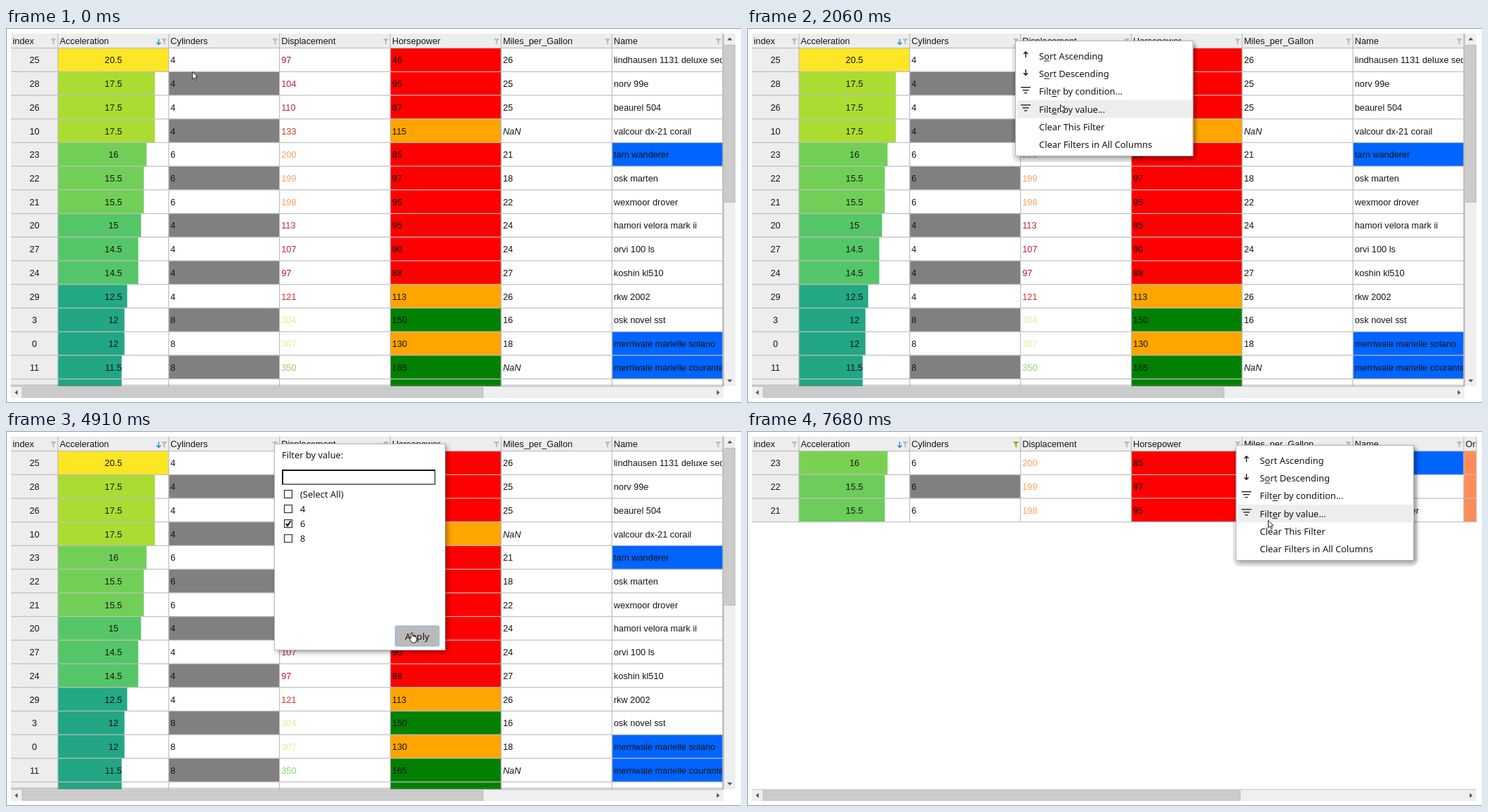
Write an HTML page with a canvas that moves like this. It is 1047 by 535 pixels and loops after 7990 ms.

```html
<!DOCTYPE html>
<html lang="en">
<head>
<meta charset="utf-8">
<style>
html, body { margin: 0; height: 100%; overflow: hidden; background: #fff; }
canvas { display: block; width: 1047px; height: 535px; }
</style>
</head>
<body>
<canvas id="stage"></canvas>
<script>
const LOOP = 7990, TOP = 28.5, ROW = 33.72, COL = 157.85;
const GRID_FONT = '12.75px "Liberation Sans", Arial, sans-serif';
const MENU_FONT = '12.9px "Noto Sans", "Open Sans", sans-serif';
const LINE = '#bebebe', INK = '#151515';

const canvas = document.getElementById('stage');
const ratio = window.devicePixelRatio || 1;
canvas.width = 1047 * ratio;
canvas.height = 535 * ratio;
const c = canvas.getContext('2d');
c.scale(ratio, ratio);

const headers = ['index', 'Acceleration', 'Cylinders', 'Displacement', 'Horsepower', 'Miles_per_Gallon', 'Name', 'Origin'];
const cars = `25|20.5|4|97|46|26|lindhausen 1131 deluxe sedan
28|17.5|4|104|95|25|norv 99e
26|17.5|4|110|87|25|beaurel 504
10|17.5|4|133|115|NaN|valcour dx-21 corail
23|16|6|200|85|21|tarn wanderer
22|15.5|6|199|97|18|osk marten
21|15.5|6|198|95|22|wexmoor drover
20|15|4|113|95|24|hamori velora mark ii
27|14.5|4|107|90|24|orvi 100 ls
24|14.5|4|97|88|27|koshin kl510
29|12.5|4|121|113|26|rkw 2002
3|12|8|304|150|16|osk novel sst
0|12|8|307|130|18|merriwale marielle solano
11|11.5|8|350|165|NaN|merriwale marielle courante
1|11.5|8|350|165|15|`.split('\n').map(line => line.split('|'));
const sixes = cars.filter(car => car[2] === '6');

const colX = i => i ? 74 + (i - 1) * COL : 7;
const pick = (v, stops) => stops.find(s => v < s[0])[1];
const barColor = v => pick(v, [[12.2, '#22a685'], [14, '#23a983'], [15.2, '#55c667'],
  [16.5, '#71cf57'], [19, '#abdc32'], [99, '#fde624']]);
const dispColor = v => pick(v, [[100, '#b0142f'], [115, '#c3233a'], [150, '#d7302f'],
  [250, '#fb9f5b'], [320, '#dcf08f'], [999, '#8fd067']]);
const powerColor = v => pick(v, [[100, '#f00'], [150, '#ffa500'], [999, '#008000']]);

function box(x, y, w, h, fill) {
  c.fillStyle = fill;
  c.fillRect(x, y, w, h);
}

function text(s, x, y, { font = GRID_FONT, color = INK, align = 'left' } = {}) {
  c.font = font;
  c.fillStyle = color;
  c.textAlign = align;
  c.fillText(s, x, y);
}

function shape(x, y, points, fill, stroke) {
  c.beginPath();
  points.forEach(([px, py]) => c.lineTo(x + px, y + py));
  c.closePath();
  c.fillStyle = fill;
  c.fill();
  if (stroke) {
    c.strokeStyle = stroke;
    c.lineWidth = 1;
    c.stroke();
  }
}

function lines(color, width, ...paths) {
  c.strokeStyle = color;
  c.lineWidth = width;
  c.beginPath();
  for (const path of paths) path.forEach(([x, y], i) => i ? c.lineTo(x, y) : c.moveTo(x, y));
  c.stroke();
}

// dir is 1 for down, -1 for up
function arrow(x, y, dir, color) {
  lines(color, 1.4, [[x, y - 4 * dir], [x, y + 4 * dir]],
    [[x - 3, y + dir], [x, y + 4 * dir], [x + 3, y + dir]]);
}

function clipped(x, y, w, h, draw) {
  c.save();
  c.beginPath();
  c.rect(x, y, w, h);
  c.clip();
  draw();
  c.restore();
}

function drawHeader(right, filtered) {
  box(7, 8, right - 7, 20, '#ededed');
  headers.forEach((name, i) => {
    const edge = colX(i + 1);
    text(name, colX(i) + 2.5, 23);
    const color = filtered && i === 2 ? '#b3a000' : '#bcbcbc';
    shape(edge - 10.5, 15, [[0, 0], [8, 0], [5, 4], [5, 9], [3, 7.5], [3, 4]], color);
  });
  arrow(217.5, 19.5, 1, '#1296ae');
}

function drawRow(car, r, filtered) {
  const [index, accel, cyl, disp, power, mpg, name] = car;
  const y = TOP + r * ROW, base = y + ROW / 2 + 5;
  const cell = (i, fill) => box(colX(i), y, COL, ROW, fill);
  box(7, y, 67, ROW, '#ededed');
  const bar = filtered ? (accel > 15.7 ? '#7ad151' : '#6ccd5a') : barColor(+accel);
  box(74, y, COL * Math.min(1, accel / 20), ROW, bar);
  if (r % 2) cell(2, '#808080');
  cell(4, powerColor(+power));
  if (/^(tarn|merriwale)/.test(name)) cell(6, '#0064ff');
  cell(7, '#fc8d59');
  text(index, 40.5, base, { align: 'center' });
  text(accel, 153, base, { align: 'center' });
  text(cyl, colX(2) + 2.5, base);
  text(disp, colX(3) + 2.5, base, { color: dispColor(+disp) });
  text(power, colX(4) + 2.5, base);
  text(mpg, colX(5) + 2.5, base, { font: (mpg === 'NaN' ? 'italic ' : '') + GRID_FONT });
  clipped(colX(6), y, COL - 1, ROW, () => text(name, colX(6) + 2.5, base));
}

function drawGrid(filtered) {
  const rows = filtered ? sixes : cars, right = filtered ? 1039 : 1022;
  const bottom = Math.min(511, TOP + rows.length * ROW);
  clipped(7, 8, right - 7, bottom - 7, () => {
    drawHeader(right, filtered);
    rows.forEach((car, r) => drawRow(car, r, filtered));
    for (let r = 0; r <= rows.length; r++) box(7, TOP - .5 + r * ROW, right - 7, 1.2, LINE);
    for (let i = 1; i < 8; i++) box(colX(i) - .7, 8, 1.2, bottom - 7, LINE);
  });
  if (filtered) box(1038.5, 8, 1, bottom - 8, LINE);
  else {
    box(7, 508.5, 1015, 2.5, 'rgba(120,120,120,.3)');
    box(1021.5, 8, 1.3, 503, '#b5b5b5');
  }
}

function drawScrollbars(filtered) {
  const right = filtered ? 1039 : 1022, tri = '#505050';
  box(7, 512, right - 7, 16, '#efefef');
  box(7, 511, right - 7, 1, '#c4c4c4');
  box(22.5, 512.5, filtered ? 680.5 : 657.5, 15, '#bdbdbd');
  box(23.5, 513.5, filtered ? 678.5 : 655.5, 13, '#cbcbcb');
  shape(15, 520, [[-2.5, 0], [1.5, -3.5], [1.5, 3.5]], tri);
  shape(right - 8, 520, [[2.5, 0], [-1.5, -3.5], [-1.5, 3.5]], tri);
  if (filtered) return;
  box(1023, 8, 16, 503, '#efefef');
  box(1023.5, 24, 15.5, 225, '#bdbdbd');
  box(1024.5, 25, 13.5, 223, '#cbcbcb');
  shape(1031, 16, [[0, -2.5], [3.5, 1.5], [-3.5, 1.5]], tri);
  shape(1031, 503, [[0, 2.5], [3.5, -1.5], [-3.5, -1.5]], tri);
}

function drawPanel(x, y, w, h) {
  c.save();
  c.shadowColor = 'rgba(0,0,0,.4)';
  c.shadowBlur = 7 * ratio;
  c.shadowOffsetX = c.shadowOffsetY = 2.5 * ratio;
  box(x, y, w, h, '#fff');
  c.restore();
  c.strokeStyle = '#b4b4b4';
  c.lineWidth = 1;
  c.strokeRect(x + .5, y + .5, w - 1, h - 1);
}

const menuItems = [['Sort Ascending', 1], ['Sort Descending', 1], ['Filter by condition...', 4],
  ['Filter by value...', 4], ['Clear This Filter'], ['Clear Filters in All Columns']];

function drawMenu(x, y, mouse) {
  c.fillStyle = 'rgba(0,0,0,.08)';
  c.beginPath();
  c.roundRect(x - 4.5, y + 3, 263, 170, 9);
  c.fill();
  drawPanel(x, y, 253.5, 165);
  menuItems.forEach(([label, key], i) => {
    const mid = y + 22 + i * 25.25, iconX = x + 15, iconY = mid - 2;
    const inside = mouse.x > x + 3 && mouse.x < x + 253;
    if (inside && Math.abs(mouse.y - mid) < 12.6) box(x + 3, mid - 12.6, 250, 25.2, '#ededed');
    if (i < 2) arrow(iconX, iconY, i ? 1 : -1, INK);
    else if (i < 4) [7, 4.5, 2].forEach((half, k) => box(iconX - half, iconY - 4.5 + k * 4, 2 * half, 1.3, INK));
    text(label, x + 34, mid + 4.8, { font: MENU_FONT });
    if (key) {
      const start = c.measureText(label.slice(0, key)).width;
      box(x + 34 + start, mid + 6.5, c.measureText(label[key]).width, 1, INK);
    }
  });
}

function drawDialog(t, mouse) {
  drawPanel(382, 18, 244, 295);
  text('Filter by value:', 393, 38.5, { font: MENU_FONT });
  box(393, 55, 219, 22, '#777');
  box(393, 55, 218, 2, '#111');
  box(393, 55, 2, 21, '#111');
  box(395, 57, 215, 18, '#fff');
  ['(Select All)', '4', '6', '8'].forEach((label, i) => {
    const y = 90 + i * 21.1;
    c.strokeStyle = '#222';
    c.lineWidth = 1.1;
    c.strokeRect(396.5, y - 5.5, 11, 11);
    const checked = t < 3440 || (i === 2 && t >= 3970);
    if (checked) lines('#111', 2, [[398.8, y], [401, y + 3], [405.5, y - 3.8]]);
    text(label, 419, y + 4.7, { font: MENU_FONT });
  });
  const pressed = t >= 4910, hover = mouse.y > 278 && mouse.x > 554;
  c.beginPath();
  c.roundRect(554.5, 278, 62.5, 29, 2);
  c.fillStyle = pressed ? '#bababa' : hover ? '#e6e6e6' : '#fff';
  c.fill();
  c.strokeStyle = pressed ? '#86b5dc' : '#c4c4c4';
  c.lineWidth = 1;
  c.stroke();
  text('Apply', 585.7, 297.5, { font: MENU_FONT.replace('12.9', '13.2'), align: 'center' });
}

function drawPointer({ x, y }, hand) {
  if (hand) {
    shape(x - 3, y - 1, [[2, 0], [4, 0], [4.3, 4.5], [9.5, 6], [10, 9], [8.5, 14], [3.5, 14],
      [0, 9], [-.5, 7], [2, 8]], '#fff', '#222');
  } else {
    shape(x + .5, y + .5, [[0, 0], [0, 10.5], [2.4, 8.4], [4, 12], [5.8, 11.2], [4.2, 7.6], [7.4, 7.5]], '#fff', '#222');
  }
}

// start, end, number of positions, waypoints
const moves = [
  [0, 1, 1, [[265, 62]]],
  [120, 800, 6, [[256, 61], [268, 54], [310, 38], [365, 22], [382, 18]]],
  [1080, 2060, 8, [[382, 18], [388, 36], [414, 76], [440, 104], [446, 109]]],
  [2310, 3290, 8, [[446, 109], [428, 104], [388, 92], [364, 86], [391, 85], [397, 86], [400, 87], [401, 88]]],
  [3440, 4380, 8, [[401, 88], [401, 100], [401, 118], [401, 130], [402, 131], [435, 156], [535, 220], [590, 256]]],
  [4520, 4910, 4, [[586, 272], [580, 284], [578, 289], [578, 289]]],
  [5030, 5460, 4, [[587, 269], [598, 240], [624, 175], [643, 126]]],
  [5610, 6570, 7, [[650, 108], [672, 66], [690, 30], [697, 20]]],
  [6870, 7680, 7, [[697, 20], [706, 44], [726, 94], [739, 122], [742, 127]]],
];

function mouseAt(t) {
  const [start, end, count, path] = moves.findLast(m => t >= m[0]);
  const gap = (end - start) / Math.max(1, count - 1);
  const step = Math.min(count - 1, Math.floor((t - start) / gap + .001));
  const u = step / Math.max(1, count - 1) * (path.length - 1);
  const i = Math.floor(u), f = u - i, a = path[i], b = path[i + 1] || a;
  return { x: a[0] + (b[0] - a[0]) * f, y: a[1] + (b[1] - a[1]) * f };
}

function render(t) {
  const mouse = mouseAt(t), filtered = t >= 5030;
  box(0, 0, 1047, 535, '#fff');
  box(0, 0, 1047, 1, '#9a9a9a');
  box(0, 0, 1, 535, '#9a9a9a');
  box(0, 534, 1047, 1, '#9a9a9a');
  drawGrid(filtered);
  drawScrollbars(filtered);
  if (t >= 1080 && t < 2310) drawMenu(382, 18, mouse);
  if (t >= 2310 && t < 5030) drawDialog(t, mouse);
  if (t >= 6870) drawMenu(696.5, 20, mouse);
  drawPointer(mouse, t >= 4520 && !filtered && mouse.y > 278);
}

const origin = performance.now();
function tick() {
  render((performance.now() - origin) % LOOP);
  requestAnimationFrame(tick);
}
tick();
</script>
</body>
</html>
```
